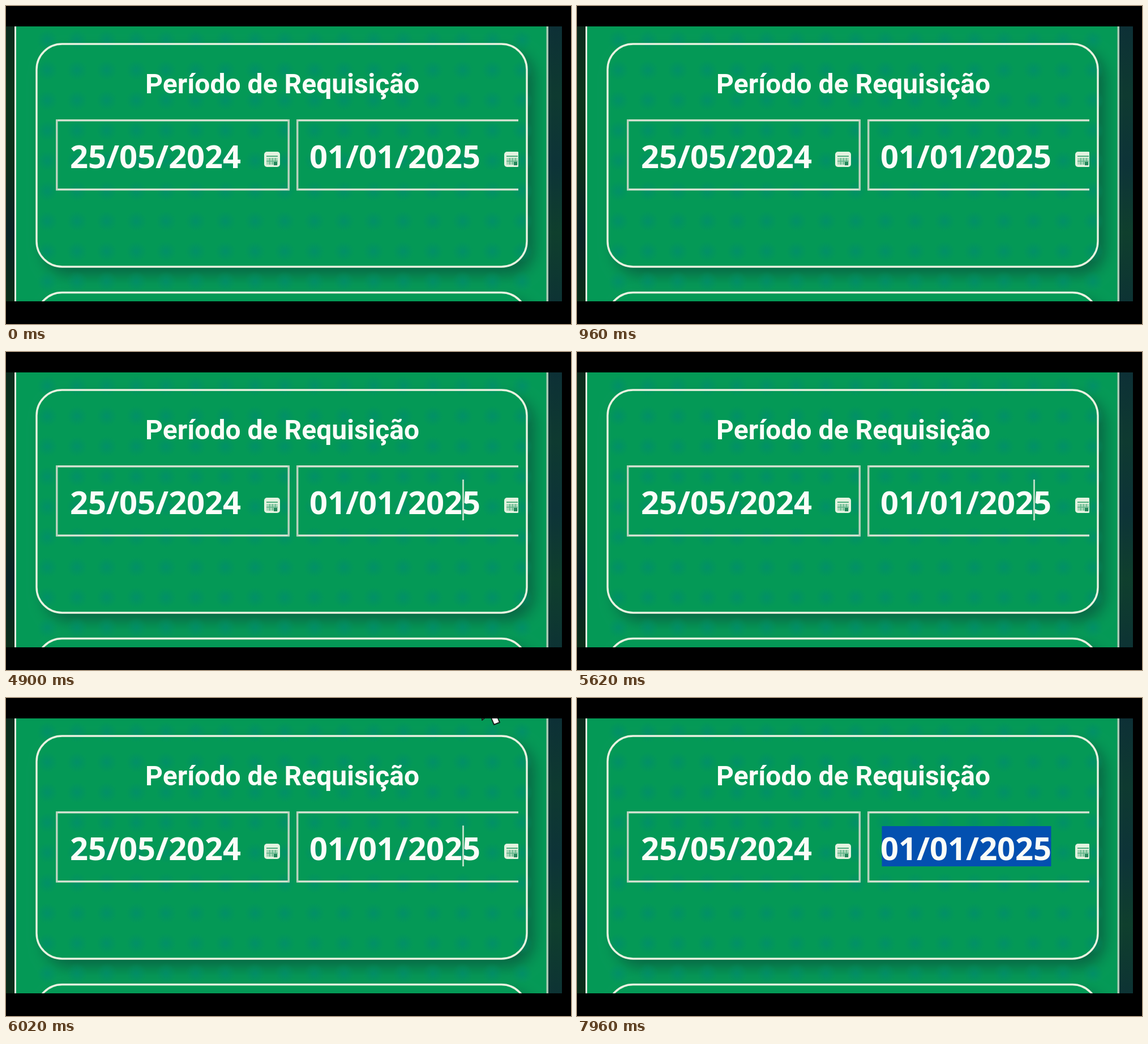
An HTML page with a canvas that plays this animation: 998x561 px, repeating every 8000 ms.

```html
<!DOCTYPE html>
<html lang="pt">
<head>
<meta charset="utf-8">
<style>
html, body { margin: 0; width: 100%; height: 100%; overflow: hidden; background: #000; }
canvas { display: block; }
</style>
</head>
<body>
<canvas id="stage" width="998" height="561"></canvas>
<script>
const ctx = document.getElementById('stage').getContext('2d');
const LOOP = 8000;
const GREEN = '#049956';
const LINE = '#e9f2e0';
const TAU = Math.PI * 2;

// Pointer trips: [time, x, y] of the arrow tip
const TRIPS = [
  [[3220, 928, 234], [3240, 928, 234], [3360, 846, 263]],
  [[5740, 826, 200], [6020, 841, -18], [6040, 841, -18], [6320, 815, 66], [6420, 815, 66], [6500, 808, 200]]
];
const CARET = [4900, 6560];
const SELECT_AT = 6560;

function rect(x, y, w, h, color) {
  ctx.fillStyle = color;
  ctx.fillRect(x, y, w, h);
}

function round(x, y, w, h, r) {
  ctx.beginPath();
  ctx.roundRect(x, y, w, h, r);
}

function strip(x, w, colors) {
  const g = ctx.createLinearGradient(0, 36, 0, 521);
  colors.forEach((c, i) => g.addColorStop(i / (colors.length - 1), c));
  rect(x, 36, w, 485, g);
}

function text(str, x, y, font) {
  ctx.font = font;
  ctx.fillStyle = '#fbfdf8';
  ctx.fillText(str, x, y);
}

function cardBase(y, h) {
  ctx.save();
  ctx.shadowColor = 'rgba(10, 70, 55, 0.62)';
  ctx.shadowBlur = 26;
  ctx.shadowOffsetX = 13;
  ctx.shadowOffsetY = 14;
  ctx.fillStyle = GREEN;
  round(54, y, 866, h, 45);
  ctx.fill();
  ctx.restore();
}

function cardLine(y, h) {
  ctx.strokeStyle = LINE;
  ctx.lineWidth = 3.4;
  round(54, y, 866, h, 45);
  ctx.stroke();
}

function dots() {
  for (let row = 0; row < 9; row++) {
    for (let col = 0; col < 17; col++) {
      const x = 73 + col * 52.4, y = 60 + row * 53.3;
      const g = ctx.createRadialGradient(x, y, 2, x, y, 19);
      g.addColorStop(0, 'rgba(0, 140, 112, 0.6)');
      g.addColorStop(0.5, 'rgba(0, 142, 106, 0.35)');
      g.addColorStop(1, 'rgba(0, 145, 100, 0)');
      rect(x - 20, y - 20, 40, 40, g);
    }
  }
}

function field(x, w) {
  rect(x, 200, w, 3.5, '#d3e2d0');
  rect(x, 322, w, 3.5, '#d3e2d0');
  rect(x, 200, 3.5, 125, '#b9d2bd');
}

function calendar(x, y) {
  ctx.fillStyle = '#e3f2df';
  round(x, y, 28, 27, 5);
  ctx.fill();
  rect(x + 4, y + 7, 20, 2, '#4fae7e');
  rect(x + 4, y + 11, 20, 12, '#a9d8b9');
  for (let i = 0; i < 3; i++) {
    rect(x + 9 + i * 5, y + 11, 1.5, 12, '#62b68b');
  }
  rect(x + 4, y + 16, 20, 1.5, '#62b68b');
  rect(x + 17, y + 18, 6, 6, '#23865a');
}

function pointer(x, y) {
  const shape = [[0, 0], [0, 57], [13, 46], [21, 65], [31, 61], [23, 42], [41, 41]];
  ctx.beginPath();
  shape.forEach(([dx, dy]) => ctx.lineTo(x + dx, y + dy));
  ctx.closePath();
  ctx.fillStyle = '#fff';
  ctx.fill();
  ctx.strokeStyle = '#17251f';
  ctx.lineWidth = 2;
  ctx.lineJoin = 'round';
  ctx.stroke();
}

function pointerAt(t) {
  for (const trip of TRIPS) {
    for (let i = 1; i < trip.length; i++) {
      const [t0, x0, y0] = trip[i - 1], [t1, x1, y1] = trip[i];
      if (t >= t0 && t < t1) {
        const k = (t - t0) / (t1 - t0);
        return [x0 + (x1 - x0) * k, y0 + (y1 - y0) * k];
      }
    }
  }
  return null;
}

function draw(t) {
  rect(0, 0, 998, 561, '#000');
  ctx.save();
  ctx.beginPath();
  ctx.rect(0, 36, 982, 485);
  ctx.clip();

  strip(0, 15, ['#0b2a1c', '#0b351c', '#0b2f1a', '#092326', '#0a2d18']);
  strip(958, 24, ['#0d3036', '#0e3a30', '#0d3338', '#0f3f2d', '#0d3334']);
  rect(15, 36, 943, 485, GREEN);
  cardBase(67, 393);
  cardBase(505, 300);
  dots();
  rect(15, 36, 3, 485, '#e4efe0');
  rect(954.5, 36, 3.5, 485, '#a9c9b3');
  cardLine(67, 393);
  cardLine(505.5, 300);

  text('Período de Requisição', 246, 154, 'bold 48px Roboto, sans-serif');

  field(88, 413);
  rect(497.5, 200, 3.5, 125, '#b9d2bd');
  field(513, 392);
  if (t >= SELECT_AT) rect(538.5, 226, 299, 71, '#0350b0');

  const dateFont = 'bold 56px "Open Sans", sans-serif';
  text('25/05/2024', 113, 286, dateFont);
  text('01/01/2025', 536, 286, dateFont);
  if (t >= CARET[0] && t < CARET[1]) rect(806, 225, 3, 72, '#b5dcc2');

  calendar(456, 257);
  ctx.save();
  ctx.beginPath();
  ctx.rect(513, 200, 392, 125);
  ctx.clip();
  calendar(880, 257);
  ctx.restore();

  const tip = pointerAt(t);
  if (tip) pointer(...tip);
  ctx.restore();
}

const start = performance.now();
function tick() {
  const t = (performance.now() - start) % LOOP;
  draw(Math.floor(t / 20) * 20);
  requestAnimationFrame(tick);
}
tick();
</script>
</body>
</html>
```
